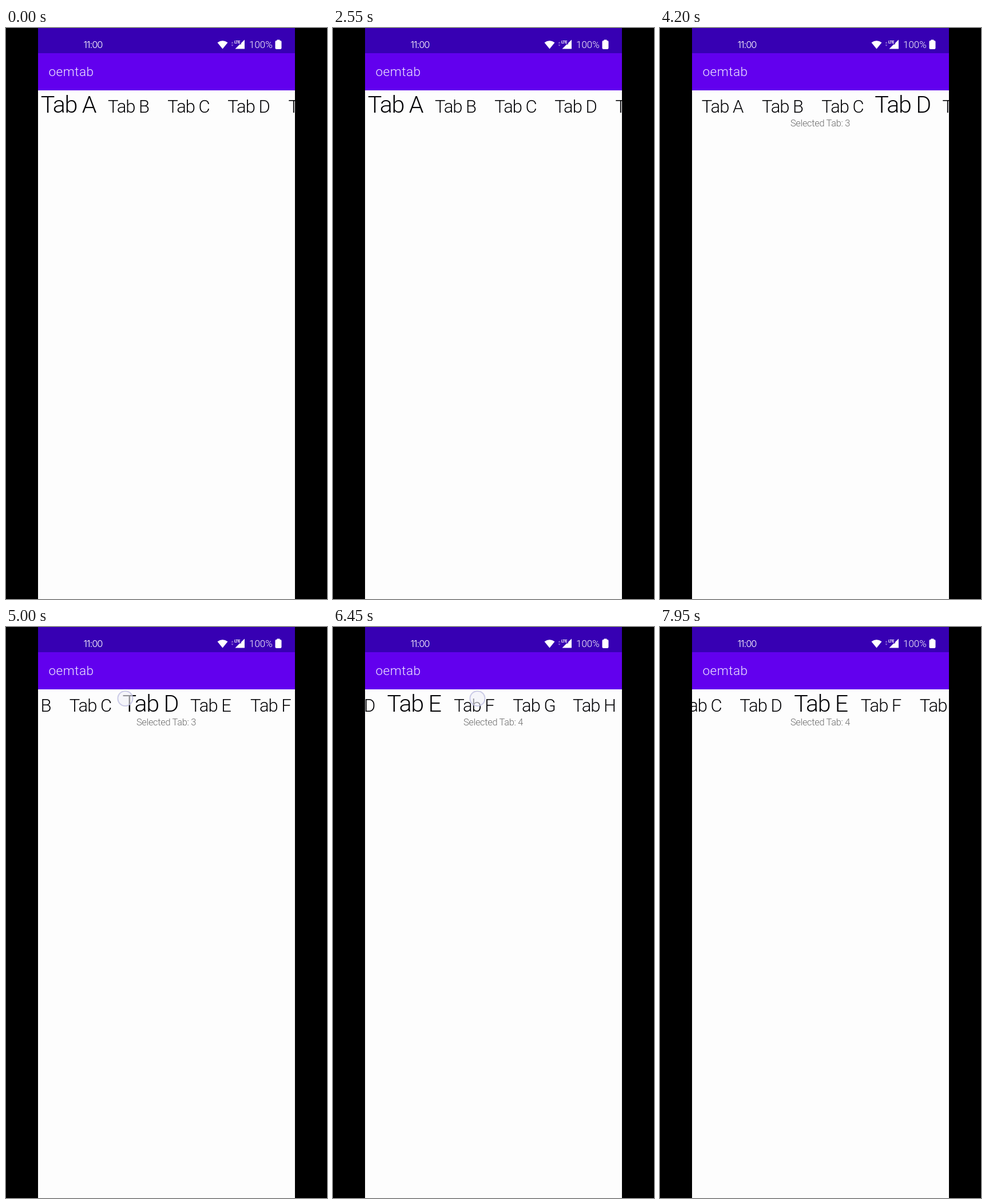
These frames come from a looping animation (561 by 998 pixels, 8 s). An HTML page:

```html
<!DOCTYPE html>
<html lang="en">
<head>
<meta charset="utf-8">
<style>
html, body { margin: 0; width: 100%; height: 100%; overflow: hidden; background: #000; }
svg { display: block; width: 561px; height: 998px; }
text { font-family: Roboto, "Liberation Sans", sans-serif; font-weight: 300; }
.tab { font-size: 31px; letter-spacing: -1px; text-anchor: middle; fill: #050508; }
</style>
</head>
<body>
<svg viewBox="0 0 561 998">
  <defs><clipPath id="screen"><rect x="56" y="0" width="449" height="998"/></clipPath></defs>
  <rect width="561" height="998"/>
  <g clip-path="url(#screen)">
    <rect x="56" width="449" height="998" fill="#fdfdfd"/>
    <g id="tabs"></g>
    <text id="label" x="280" y="172" font-size="16.4" letter-spacing="-.3" text-anchor="middle" fill="#6c6c6c"></text>
    <rect x="56" y="44" width="449" height="65" fill="#6200ee"/>
    <rect x="56" width="449" height="44" fill="#3700b3"/>
    <text x="74.5" y="84" font-size="22.5" letter-spacing=".5" fill="#f0eaff">oemtab</text>
    <g fill="#fff">
      <text x="135.5" y="35" font-size="16.5" letter-spacing="-1" style="font-family:Inter,sans-serif">11:00</text>
      <path d="M369.5 25.5Q378.5 19 387.5 25.5L378.5 36.5Z"/>
      <path d="M393.5 27l2-3 2 3zM393.5 29l2 3 2-3z" opacity=".4"/>
      <path d="M417 20.5V36.5H400.5L408.5 28.5H411V26.2Z"/>
      <text x="399" y="26.5" font-size="7" letter-spacing="-.5" style="font-weight:700">LTE</text>
      <text x="425" y="35" font-size="17">100%</text>
      <rect x="473.5" y="20.5" width="5" height="3"/>
      <rect x="470.5" y="22" width="11" height="15" rx="2"/>
    </g>
    <circle id="touch" r="13" fill="#f0f0f8" fill-opacity=".6" stroke="#bcbce0" stroke-opacity=".75" stroke-width="2"/>
  </g>
</svg>
<script>
const LOOP = 8000, GROW = 200, BIG = 1.33;
const $ = id => document.getElementById(id);
const clamp = v => Math.min(1, Math.max(0, v));
const linear = p => p;
const easeIn = p => Math.pow(p, 1.3);
const easeOut = p => 1 - Math.pow(1 - p, 3);

// [time, selected tab]
const picks = [[-GROW, 0], [2720, 1], [3330, 2], [4020, 3], [5400, 4], [6850, 6], [7800, 4]];
// [time, scroll, easing into this point]
const scrolls = [
  [0, 0, linear],
  [4750, 0, linear], [5000, 171, easeIn], [5070, 212, linear], [5400, 250, easeOut],
  [6150, 250, linear], [6480, 405, easeIn], [6850, 459, easeOut],
  [7300, 459, linear], [7500, 320, easeIn], [7850, 248, easeOut], [LOOP, 248, linear]
];
// [down, up, x, scroll when pressed]; a press without scroll is a tap
const touches = [
  [2600, 2740, 214], [3210, 3350, 319], [3900, 4040, 424],
  [4700, 5070, 380, 0], [6100, 6480, 390, 250], [7250, 7500, 215, 459]
];

const tabs = [..."ABCDEFGHIJ"].map(letter => {
  const el = document.createElementNS("http://www.w3.org/2000/svg", "text");
  el.setAttribute("class", "tab");
  el.textContent = "Tab " + letter;
  $("tabs").append(el);
  return el;
});

function scrollAt(t) {
  const i = Math.max(1, scrolls.findIndex(s => s[0] > t));
  const [t0, a] = scrolls[i - 1], [t1, b, ease] = scrolls[i];
  return a + (b - a) * ease((t - t0) / (t1 - t0));
}

function draw(t) {
  const scroll = scrollAt(t);
  const n = picks.filter(p => p[0] <= t).length - 1;
  const [since, current] = picks[n];
  const previous = n ? picks[n - 1][1] : -1;
  const grown = easeOut(clamp((t - since) / GROW));

  tabs.forEach((el, i) => {
    const weight = i === current ? grown : i === previous ? 1 - grown : 0;
    const scale = 1 + (BIG - 1) * weight;
    el.setAttribute("transform", `translate(${109 + 105 * i - scroll} 148) scale(${scale})`);
  });
  $("label").textContent = n ? "Selected Tab: " + current : "";

  const press = touches.find(p => t >= p[0] && t < p[1]);
  $("touch").setAttribute("visibility", press ? "visible" : "hidden");
  if (press) {
    const [, , x, start = scroll] = press;
    $("touch").setAttribute("transform", `translate(${x - scroll + start} 125)`);
  }
}

function tick() {
  draw(performance.now() % LOOP);
  requestAnimationFrame(tick);
}
tick();
</script>
</body>
</html>
```
